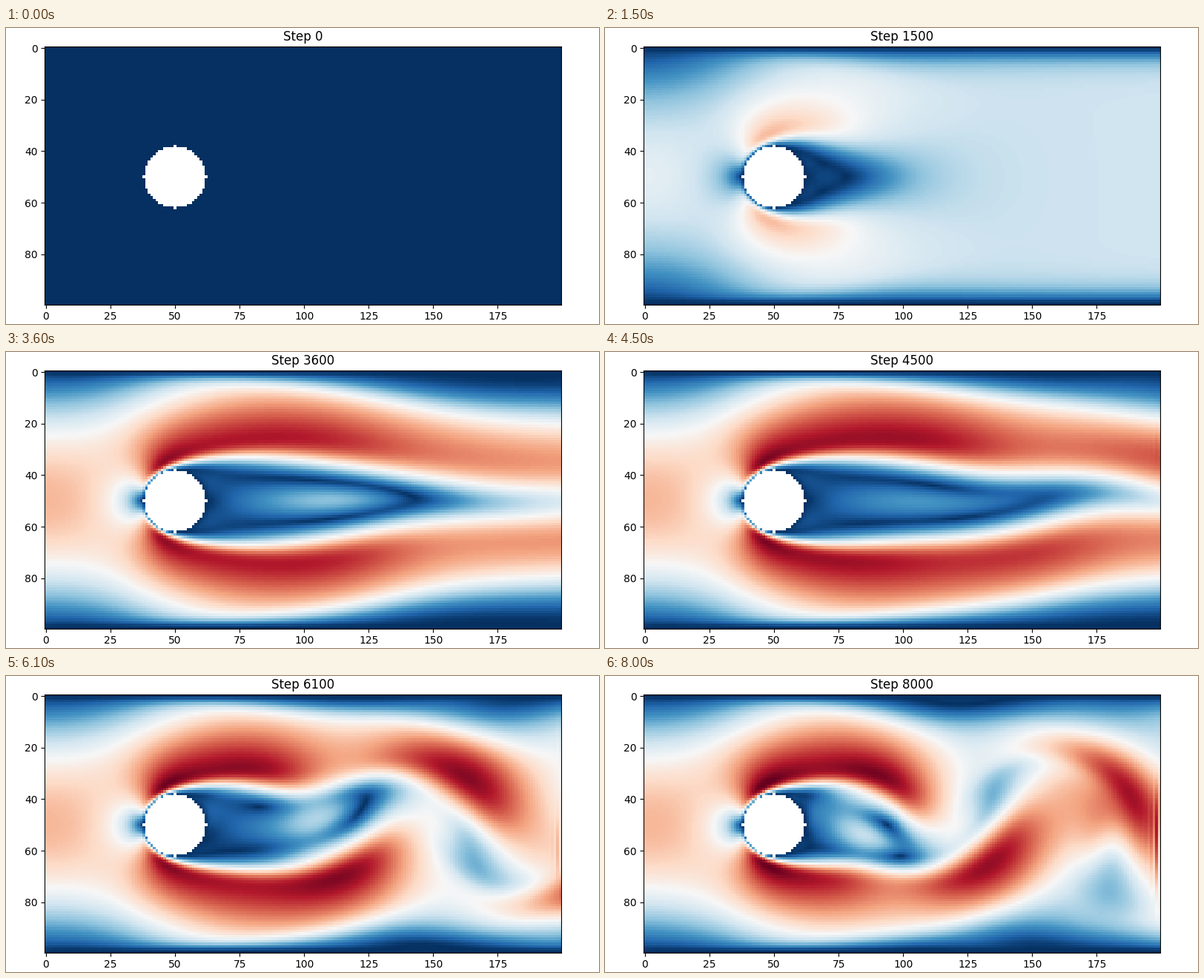
Animation of 800 by 400 pixels, one loop 8100 ms. Source, as a matplotlib script:

```python
"""Channel flow past a cylinder: D2Q9 lattice Boltzmann, two relaxation times."""
import math

import matplotlib.pyplot as plt
import numpy as np
from matplotlib.animation import FuncAnimation

NX, NY = 200, 100
N = NX * NY
STEPS_PER_FRAME, FRAMES = 100, 81
U_MAX, RADIUS, RAMP, REYNOLDS = 0.2, 12, 1000, 100
VISCOSITY = (2 / 3 * U_MAX) * (2 * RADIUS) / REYNOLDS
TAU = 3 * VISCOSITY + 0.5
OM_P = 1 / TAU
OM_M = 1 / (0.25 / (TAU - 0.5) + 0.5)

# Rest, E, N, NE, SE, then the four opposites W, S, SW, NW
CX = [0, 1, 0, 1, 1, -1, 0, -1, -1]
CY = [0, 0, 1, 1, -1, 0, -1, -1, 1]
W = [4 / 9] + [1 / 9, 1 / 9, 1 / 36, 1 / 36] * 2
weights = np.array(W, np.float32).reshape(9, 1)
shifts = [y * NX + x for x, y in zip(CX, CY)][1:]

yy, xx = np.mgrid[:NY, :NX]
cylinder = (xx - 50) ** 2 + (yy - 50) ** 2 <= RADIUS ** 2
solid = cylinder | (yy == 0) | (yy == NY - 1)
fluid = (~solid).astype(np.float32).ravel()
rows = np.arange(1, NY - 1, dtype=np.float32)
inflow = 4 * U_MAX * rows * (NY - 1 - rows) / (NY - 1) ** 2


def wall_links():
    """Flat indices that turn populations leaving towards a solid around."""
    src, dst = [], []
    for q in range(8):
        ahead = np.roll(solid, (-CY[q + 1], -CX[q + 1]), (0, 1))
        cells = np.flatnonzero(ahead & ~solid)
        src.append(q * N + cells)
        dst.append(((q + 4) % 8 + 1) * N + cells)
    return np.concatenate(src), np.concatenate(dst)


def set_inlet(g, u):
    """Zou-He column with a given velocity."""
    rho = (g[0] + g[2] + g[6] + 2 * (g[5] + g[7] + g[8])) / (1 - u)
    skew, push = 0.5 * (g[2] - g[6]), rho * u / 6
    g[1] = g[5] + 4 * push
    g[3] = g[7] - skew + push
    g[4] = g[8] + skew + push


def set_outlet(g):
    """Zou-He column with unit density."""
    flux = g[0] + g[2] + g[6] + 2 * (g[1] + g[3] + g[4]) - 1
    skew, push = 0.5 * (g[2] - g[6]), flux / 6
    g[5] = g[1] - 4 * push
    g[7] = g[3] + skew - push
    g[8] = g[4] - skew - push


def simulate():
    f = np.empty((9, N), np.float32)
    f[:] = weights
    post = np.empty((8, N), np.float32)
    f_flat, post_flat = f.reshape(-1), post.reshape(-1)
    grid = f.reshape(9, NY, NX)
    left, right = grid[:, 1:-1, 0], grid[:, 1:-1, -1]
    src, dst = wall_links()
    rest, a, b = f[0], f[1:5], f[5:]
    cu = np.empty((4, N), np.float32)
    speeds = []

    for t in range((FRAMES - 1) * STEPS_PER_FRAME + 1):
        s, d = a + b, a - b
        rho = rest + s[0] + s[1] + s[2] + s[3]
        scale = fluid / rho
        u = (d[0] + d[2] + d[3]) * scale
        v = (d[1] + d[2] - d[3]) * scale
        if t % STEPS_PER_FRAME == 0:
            speed = np.hypot(u, v).reshape(NY, NX)
            speeds.append(np.ma.array(speed, mask=cylinder))

        # Collide the even and odd parts
        cu[0], cu[1], cu[2], cu[3] = u, v, u + v, u - v
        base = 1 - 1.5 * (u * u + v * v)
        odd = weights[1:5] * rho
        even = cu * cu
        even *= 4.5
        even += base
        even *= odd
        s *= 0.5
        even -= s
        even *= OM_P
        odd *= cu
        odd *= 3
        d *= 0.5
        odd -= d
        odd *= OM_M
        np.add(a, even, out=post[:4])
        post[:4] += odd
        np.add(b, even, out=post[4:])
        post[4:] -= odd
        rest += OM_P * (4 / 9 * rho * base - rest)

        # Stream, reflect, refill both ends
        for q, k in enumerate(shifts):
            if k > 0:
                f[q + 1, k:] = post[q, :-k]
            else:
                f[q + 1, :k] = post[q, -k:]
        f_flat[dst] = post_flat[src]
        ramp = 1 - math.exp(-(t + 1) ** 2 / (2 * RAMP ** 2))
        set_inlet(left, ramp * inflow)
        set_outlet(right)
    return speeds


speeds = simulate()

fig = plt.figure(figsize=(8, 4), dpi=100)
ax = fig.add_axes((52.2 / 800, 26.3 / 400, 696.6 / 800, 348.3 / 400))
image = ax.imshow(speeds[0], cmap="RdBu_r", vmin=0, vmax=1.5 * U_MAX,
                  interpolation="nearest", aspect="auto")
ax.set_xticks(range(0, 200, 25))
ax.set_yticks(range(0, 100, 20))
title = ax.set_title("Step 0")


def draw(frame):
    image.set_data(speeds[frame])
    title.set_text(f"Step {frame * STEPS_PER_FRAME}")
    return image, title


animation = FuncAnimation(fig, draw, frames=FRAMES, interval=100, repeat=True)
plt.show()
```
